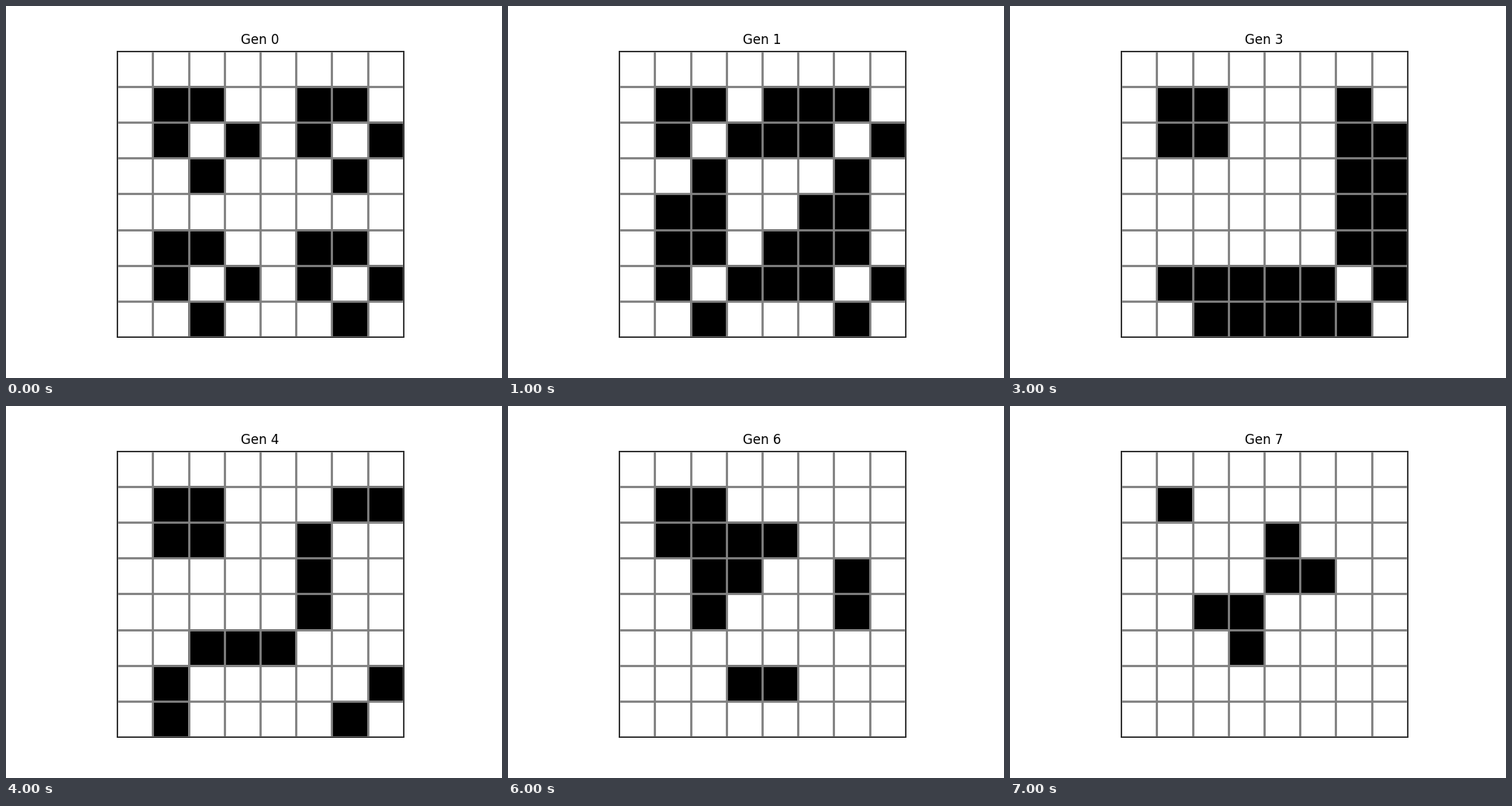
A matplotlib script that plays this animation: 640x480 px, repeating every 8 s.

```python
import numpy as np
import matplotlib.pyplot as plt
from matplotlib.animation import FuncAnimation

SIZE = 8
GENERATIONS = 8


def step(cells):
    """Advance Conway's Game of Life by one generation with dead borders."""
    padded = np.pad(cells, 1)
    near = sum(padded[r:r + SIZE, c:c + SIZE]
               for r in range(3) for c in range(3)) - cells
    return ((near == 3) | ((cells == 1) & (near == 2))).astype(int)


boat = np.array([[0, 0, 0, 0],
                 [0, 1, 1, 0],
                 [0, 1, 0, 1],
                 [0, 0, 1, 0]])
history = [np.tile(boat, (2, 2))]
while len(history) < GENERATIONS:
    history.append(step(history[-1]))

fig, ax = plt.subplots(figsize=(6.4, 4.8), dpi=100)
image = ax.imshow(history[0], cmap="binary", vmin=0, vmax=1,
                  interpolation="nearest")
title = ax.set_title("Gen 0")

edges = np.arange(-0.5, SIZE, 1)
ax.set_xticks([])
ax.set_yticks([])
ax.set_xticks(edges, minor=True)
ax.set_yticks(edges, minor=True)
ax.grid(which="minor", color="gray", linestyle="-", linewidth=2)
ax.tick_params(which="minor", length=0)


def update(gen):
    image.set_data(history[gen])
    title.set_text(f"Gen {gen}")
    return image, title


anim = FuncAnimation(fig, update, frames=GENERATIONS, interval=1000,
                     repeat=True, blit=False)
plt.show()
```
